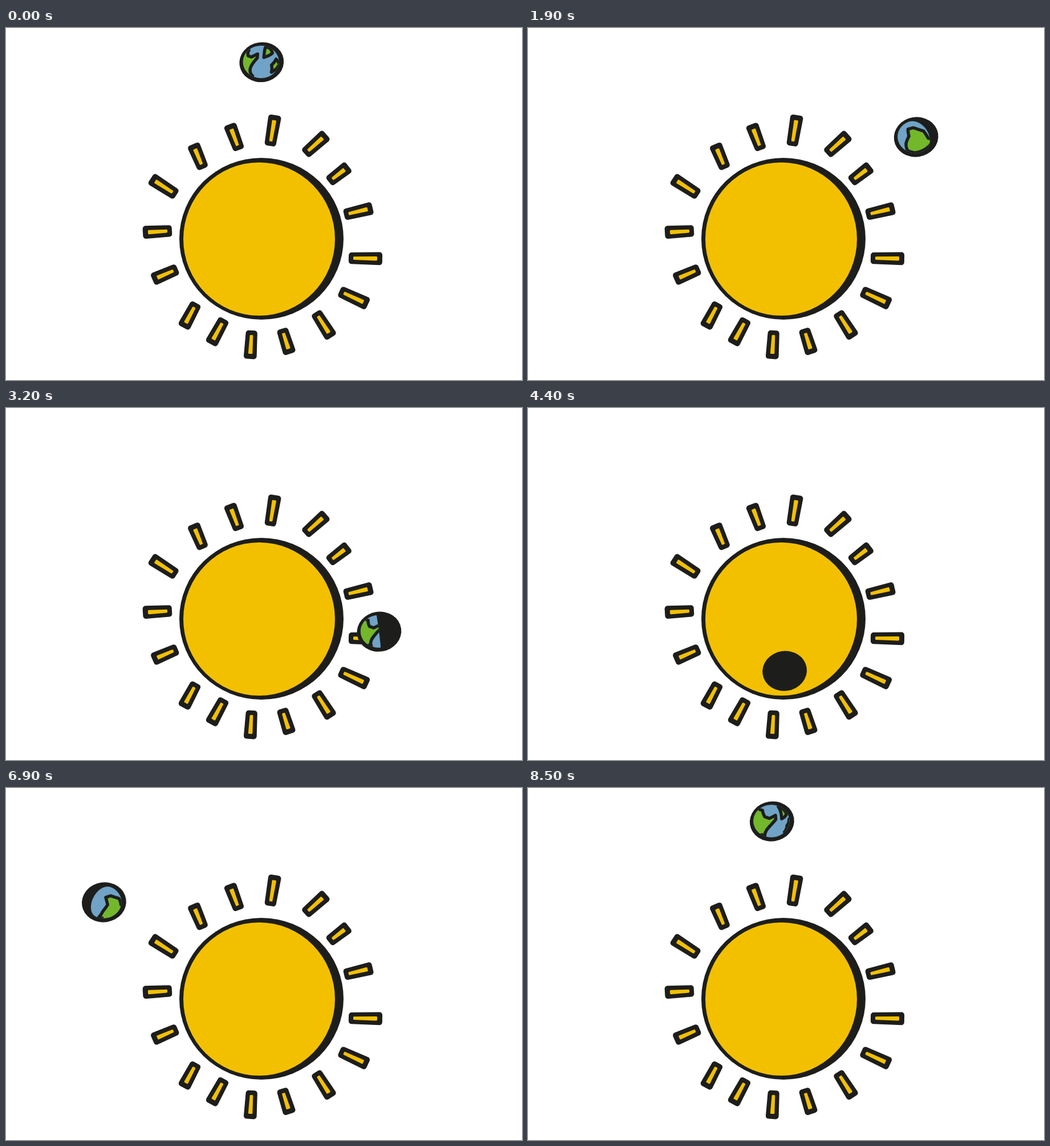
Recreate the animation shown at these times as an HTML page with a canvas. Size 905 by 618 pixels, loop 8600 ms.

```html
<!DOCTYPE html>
<html lang="en">
<head>
<meta charset="utf-8">
<title>Earth around the Sun</title>
<style>
  html, body { margin: 0; width: 100%; height: 100%; overflow: hidden; background: #fff; }
  canvas { display: block; }
</style>
</head>
<body>
<canvas id="stage" width="905" height="618"></canvas>
<script>
const ctx = document.getElementById('stage').getContext('2d');
const LOOP = 8600, STEP = 100, RAD = Math.PI / 180;
const INK = '#1d1e1c', SUN = '#f3c000', SEA = '#70a3c6', LAND = '#73b72b';

// Hand-drawn rays: outer end x, y, inner end x, y
const rays = [
  [328, 204, 346, 247], [392, 169, 409, 214], [472, 153, 463, 207], [562, 187, 524, 221],
  [601, 243, 566, 270], [643, 316, 593, 328], [660, 405, 601, 404], [635, 485, 585, 462],
  [571, 543, 543, 499], [498, 572, 484, 528], [428, 581, 431, 531], [359, 555, 383, 511],
  [311, 526, 334, 483], [257, 442, 301, 423], [240, 359, 291, 356], [254, 264, 299, 293]];

// Coastlines as longitude, latitude in degrees
const lands = [
  [[0, 18], [15, 29], [56, 28], [79, 8], [96, 7], [112, 24], [117, 10], [100, -35],
    [90, -75], [8, -75], [8, -35], [14, -5]],
  [[125, 75], [137, 18], [172, 46], [172, 75]],
  [[171, 0], [188, 25], [225, 10], [188, -25]]
];

// Time, degrees along the orbit, longitude facing the viewer
const journey = [
  [0, 2.6, 133], [900, 25, 428], [1900, 65, 755], [3200, 126, 1195], [4400, 177, 1508],
  [5700, 231, 1820], [6900, 282, 2158], [8100, 341, 2514], [LOOP, 362.6, 2653]];

function track(rows, t) {
  const i = rows.findIndex(row => row[0] > t), a = rows[i - 1], b = rows[i];
  const u = (t - a[0]) / (b[0] - a[0]);
  return a.slice(1).map((v, k) => v + (b[k + 1] - v) * u);
}

function fillEllipse(x, y, rx, ry, color, turn = 0) {
  ctx.fillStyle = color;
  ctx.beginPath();
  ctx.ellipse(x, y, rx, ry, turn, 0, 2 * Math.PI);
  ctx.fill();
}

// Tapered bar with round corners along the local x axis
function fillBar(from, to, wide, narrow, radius, color) {
  const corners = [[from, -wide], [to, -narrow], [to, narrow], [from, wide]];
  ctx.fillStyle = color;
  ctx.beginPath();
  ctx.moveTo(from, 0);
  corners.forEach((p, i) => ctx.arcTo(...p, ...corners[(i + 1) % 4], radius));
  ctx.closePath();
  ctx.fill();
}

function drawRay([x1, y1, x2, y2]) {
  const length = Math.hypot(x2 - x1, y2 - y1);
  ctx.save();
  ctx.translate(x1, y1);
  ctx.rotate(Math.atan2(y2 - y1, x2 - x1));
  fillBar(0, length, 11.5, 10, 5, INK);
  fillBar(9, length - 8, 3.8, 2.8, 1.5, SUN);
  ctx.restore();
}

function drawSun() {
  fillEllipse(448, 370, 144, 142, INK);
  fillEllipse(444, 370.5, 133, 134.5, SUN);
  rays.forEach(drawRay);
}

// Day side: one half is full, the other is bounded by the shadow line
function clipLit(orbit, rx, ry) {
  const behind = Math.min(orbit, 360 - orbit) / 180;
  const shade = 1 - 2 * behind * behind;
  const [left, right] = orbit < 180 ? [1, shade] : [shade, 1];
  const s0 = Math.sin(orbit * RAD), c0 = Math.cos(orbit * RAD);
  const tilt = -20 * RAD * s0 * (1 + c0), c = Math.cos(tilt), s = Math.sin(tilt);
  ctx.beginPath();
  for (let a = 0; a < 360; a += 5) {
    const across = Math.cos(a * RAD), y = Math.sin(a * RAD);
    const x = across * (across > 0 ? right : left);
    ctx.lineTo((x * c - y * s) * rx, (x * s + y * c) * ry);
  }
  ctx.closePath();
  ctx.clip();
}

// Orthographic view of the globe; hidden points slide just past the edge
function drawLand(coast, facing, rx, ry) {
  const roll = 18 * RAD, c = Math.cos(roll), s = Math.sin(roll), cuts = 5;
  let seen = false;
  ctx.beginPath();
  coast.forEach((p, i) => {
    const q = coast[(i + 1) % coast.length];
    for (let k = 0; k < cuts; k++) {
      const [lon, lat] = p.map((v, j) => (v + (q[j] - v) * k / cuts - (j ? 0 : facing)) * RAD);
      const u = Math.sin(lon) * Math.cos(lat), v = -Math.sin(lat);
      const front = Math.cos(lon) > 0, push = front ? 1 : 1.2 / Math.hypot(u, v);
      seen = seen || front;
      ctx.lineTo((u * c - v * s) * push * rx, (u * s + v * c) * push * ry);
    }
  });
  ctx.closePath();
  if (!seen) return;
  ctx.fill();
  ctx.stroke();
}

function drawEarth(t) {
  const [orbit, facing] = track(journey, t);
  const s = Math.sin(orbit * RAD), c = Math.cos(orbit * RAD);
  const rx = 31.5, ry = 28.5;
  ctx.save();
  ctx.translate(436 + 270 * s, 260 - 201 * c + 18 * s);
  fillEllipse(0, 0, 39, 35, INK, -.15);
  ctx.translate(-1, -.5);
  clipLit(orbit % 360, rx, ry);
  // The thin crescent near the front of the orbit stays dark
  if (Math.abs(orbit - 180) > 8) {
    ctx.fillStyle = SEA;
    ctx.fillRect(-40, -40, 80, 80);
    ctx.fillStyle = LAND;
    ctx.strokeStyle = INK;
    ctx.lineWidth = 5.5;
    ctx.lineJoin = 'round';
    lands.forEach(coast => drawLand(coast, facing, rx, ry));
  }
  ctx.restore();
}

function frame() {
  const t = Math.floor(performance.now() % LOOP / STEP) * STEP;
  ctx.fillStyle = '#fff';
  ctx.fillRect(0, 0, 905, 618);
  drawSun();
  drawEarth(t);
  requestAnimationFrame(frame);
}
frame();
</script>
</body>
</html>
```
